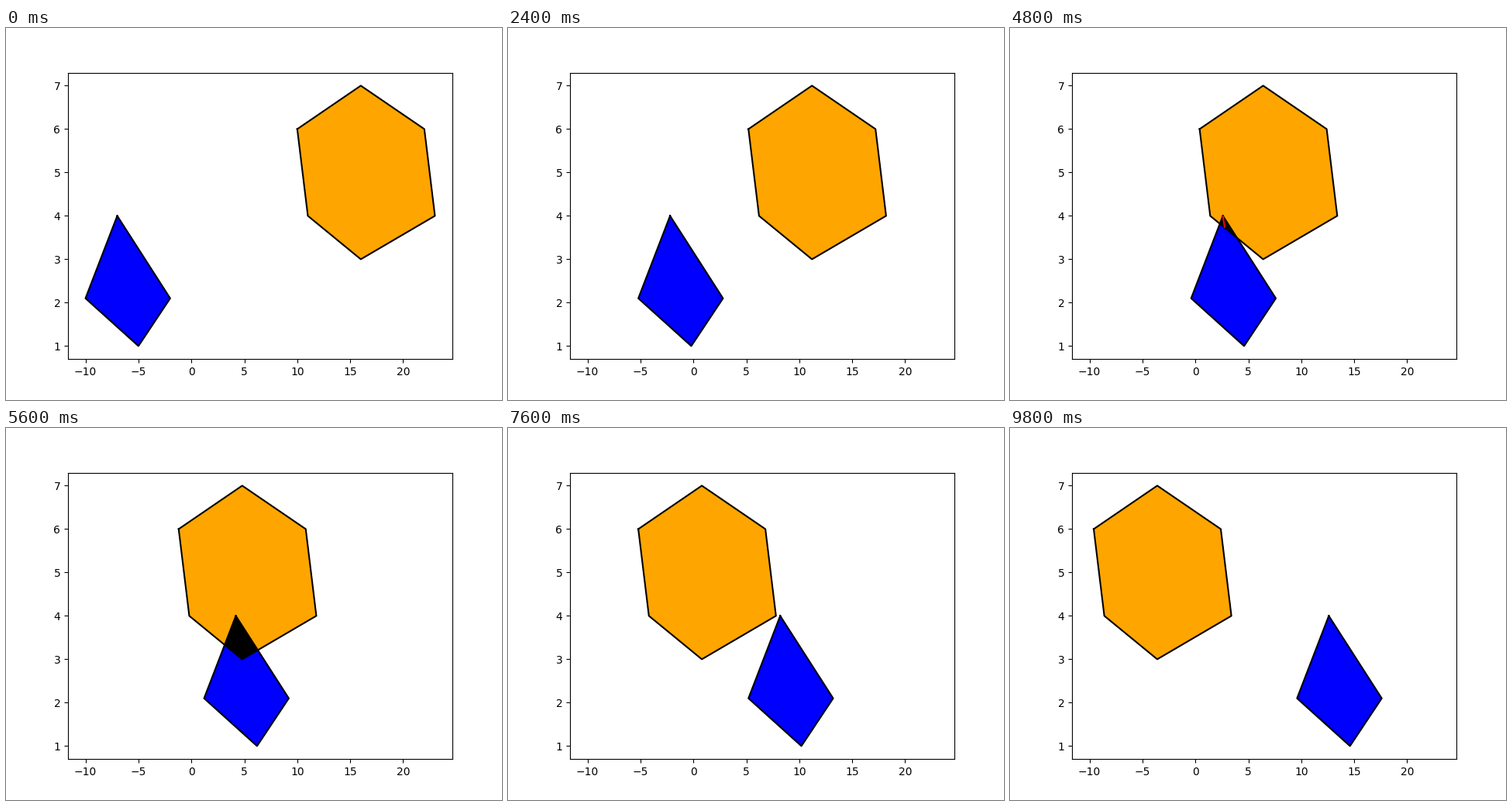
Write a matplotlib script that moves like this. It is 640 by 480 pixels and loops after 10 s.

```python
import numpy as np
import matplotlib.pyplot as plt
from matplotlib.animation import FuncAnimation

FRAMES = 50
STEP = 0.4
SHALLOW = 0.6  # overlap height below which the contact line shows

# counter-clockwise corners at the start
KITE = np.array([(-7, 4), (-10, 2.1), (-5, 1), (-2, 2.1)])
HEXAGON = np.array([(10, 6), (11, 4), (16, 3), (23, 4), (22, 6), (16, 7)])


def closed(pts):
    return np.vstack([pts, pts[:1]])


def cross(a, b):
    return a[0] * b[1] - a[1] * b[0]


def clip(subject, clipper):
    """Intersect two convex polygons (Sutherland-Hodgman)."""
    out = list(subject)
    for a, b in zip(clipper, np.roll(clipper, -1, axis=0)):
        pts, out = out, []
        for i, q in enumerate(pts):
            p = pts[i - 1]
            dp, dq = cross(b - a, p - a), cross(b - a, q - a)
            if dp * dq < 0:
                out.append(p + (q - p) * dp / (dp - dq))
            if dq >= 0:
                out.append(q)
    return np.array(out)


def contact_line(kite, hexagon):
    """Segment from the kite's tip, square to its left side, to the hexagon."""
    tip, left = kite[:2]
    a, b = hexagon[1:3]
    side = tip - left
    ray = np.array([side[1], -side[0]])
    t = cross(a - tip, b - a) / cross(ray, b - a)
    return np.array([tip, tip + t * ray])


fig, ax = plt.subplots(figsize=(6.4, 4.8), dpi=100)
corners = np.vstack([KITE, HEXAGON])
for lo, hi, set_lim in zip(corners.min(0), corners.max(0),
                           (ax.set_xlim, ax.set_ylim)):
    pad = 0.05 * (hi - lo)
    set_lim(lo - pad, hi + pad)


def add_shape(pts, color):
    fill, = ax.fill(*pts.T, color=color, lw=0)
    edge, = ax.plot(*closed(pts).T, color="black", lw=1.5)
    return fill, edge


def place(shape, pts):
    shape[0].set_xy(pts)
    shape[1].set_data(*closed(pts).T)


hex_shape = add_shape(HEXAGON, "orange")
kite_shape = add_shape(KITE, "blue")
overlap, = ax.fill([0], [0], color="black", lw=0, zorder=3)
contact, = ax.plot([], [], color="red", lw=1.5, zorder=4,
                   solid_capstyle="butt")


def update(i):
    shift = np.array([STEP * i, 0])
    kite, hexagon = KITE + shift, HEXAGON - shift
    place(kite_shape, kite)
    place(hex_shape, hexagon)

    common = clip(kite, hexagon)
    hit = len(common) > 2
    overlap.set_visible(hit)
    contact.set_visible(False)
    if hit:
        overlap.set_xy(common)
        entering = kite[0, 0] < hexagon[2, 0]
        if entering and np.ptp(common[:, 1]) < SHALLOW:
            contact.set_data(*contact_line(kite, hexagon).T)
            contact.set_visible(True)
    return (*hex_shape, *kite_shape, overlap, contact)


anim = FuncAnimation(fig, update, frames=FRAMES, interval=200,
                     repeat=True, repeat_delay=0)
plt.show()
```
